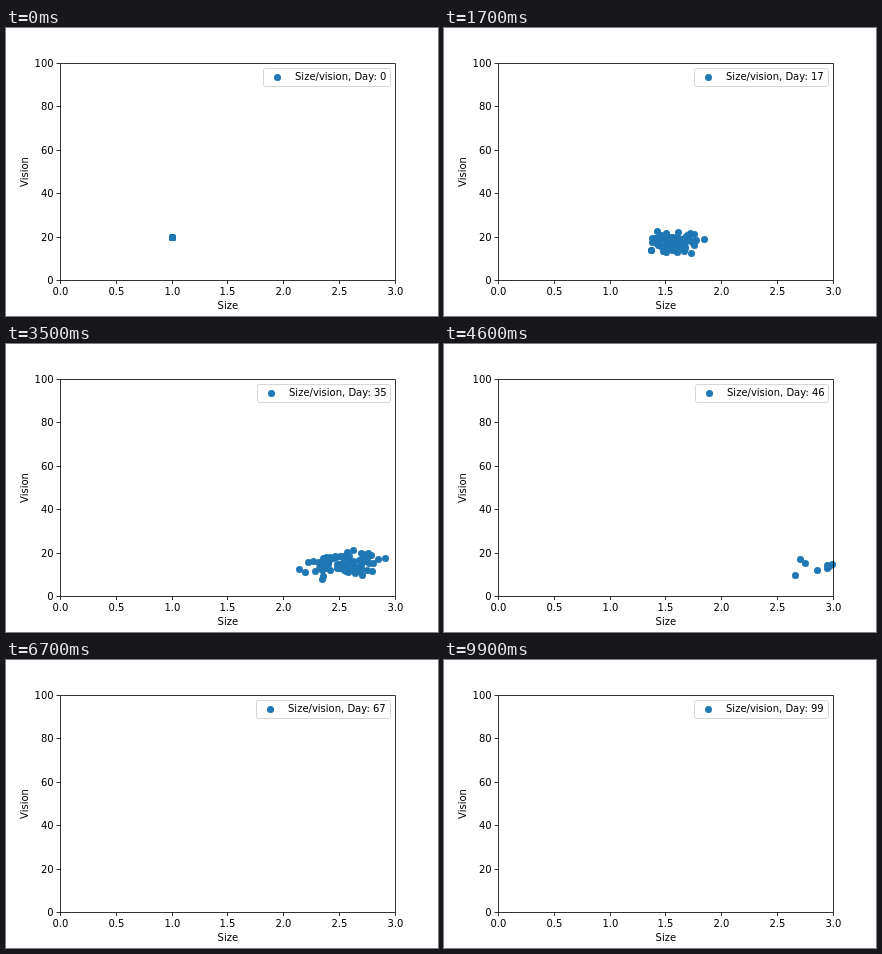
Recreate the animation shown at these times as an HTML page. Size 432 px wide and 288 px high, loop 10 s.

```html
<!DOCTYPE html>
<html lang="en">
<head>
<meta charset="utf-8">
<title>Size and vision by day</title>
<style>
  html, body { margin: 0; width: 432px; height: 288px; overflow: hidden; background: #fff; }
  svg { display: block; }
  text { font: 10px "DejaVu Sans", Verdana, sans-serif; white-space: pre; }
  .mid { text-anchor: middle; }
  .end { text-anchor: end; }
  .axis { fill: none; stroke: #000; stroke-width: .8; }
  circle { fill: #1f77b4; }
</style>
</head>
<body>
<svg width="432" height="288" viewBox="0 0 432 288">
  <g id="dots"></g>
  <path class="axis" d="M54.5 35.5H389.5V252.5H54.5Z"/>
  <g id="ticks"></g>
  <text class="mid" x="221.8" y="281">Size</text>
  <text class="mid" transform="translate(21.5 144) rotate(-90)">Vision</text>
  <rect id="box" y="40.5" height="18" rx="2" fill="#fff" fill-opacity=".8" stroke="#ccc" stroke-opacity=".8"/>
  <circle id="mark" cy="49.5" r="3.5"/>
  <text id="label" y="52"></text>
</svg>
<script>
const $ = id => document.getElementById(id);
const STEP = 100, DAYS = 100, LAST_BIRTH = 50, BIRTHS = 28, MAX_LIFE = 5, MAX_SIZE = 3;

let seed = 11;
const rand = () => (seed = seed * 16807 % 2147483647) / 2147483647;
const noise = () => 2 * (rand() + rand() + rand()) - 3; // bell-shaped, deviation 1
const toX = size => Math.round(54 + size * 111.6) + .5;
const toY = vision => Math.round(252 - vision * 2.1744) + .5;

function drawTicks() {
  let out = '';
  for (let size = 0; size <= MAX_SIZE; size += .5) {
    const x = toX(size);
    out += `<path class="axis" d="M${x} 252.5v3.5"/>` +
      `<text class="mid" x="${x - .1}" y="267">${size.toFixed(1)}</text>`;
  }
  for (let vision = 0; vision <= 100; vision += 20) {
    const y = toY(vision);
    out += `<path class="axis" d="M54.5 ${y}h-4"/>` +
      `<text class="end" x="47.7" y="${y + 3.5}">${vision}</text>`;
  }
  $('ticks').innerHTML = out;
}

// Each creature keeps its traits for life. Newborns grow larger and see less
// from day to day, until all outgrow the size limit and the herd dies out.
const herd = [];
function populate() {
  for (let born = 0; born <= LAST_BIRTH; born++) {
    const meanSize = 1 + .0305 * born + .00043 * born ** 2;
    const meanVision = 20 - .16 * born;
    const spread = born ? 1 : 0;
    for (let i = 0; i < BIRTHS; i++) {
      const size = meanSize + spread * noise() * (.03 + .0042 * born);
      const vision = meanVision + spread * noise() * (2 + .025 * born);
      const dies = born + 1 + Math.floor(rand() * MAX_LIFE);
      if (size <= MAX_SIZE) herd.push({ x: toX(size), y: toY(vision), born, dies });
    }
  }
}

function drawDay(day) {
  $('dots').innerHTML = herd.filter(c => c.born <= day && day < c.dies)
    .map(c => `<circle cx="${c.x}" cy="${c.y}" r="3.5"/>`).join('');
  const wide = [7, 9].includes(day % 10);
  const left = day < 10 ? 257 : wide ? 250 : 251;
  $('box').setAttribute('x', left + .5);
  $('box').setAttribute('width', 384 - left);
  $('mark').setAttribute('cx', left + 14.5);
  $('label').setAttribute('x', left + 32);
  $('label').textContent = `Size/vision, Day: ${day}`;
}

let shown = -1;
const start = performance.now();
function frame() {
  const day = Math.floor((performance.now() - start) / STEP) % DAYS;
  if (day !== shown) drawDay(shown = day);
  requestAnimationFrame(frame);
}

drawTicks();
populate();
frame();
</script>
</body>
</html>
```
